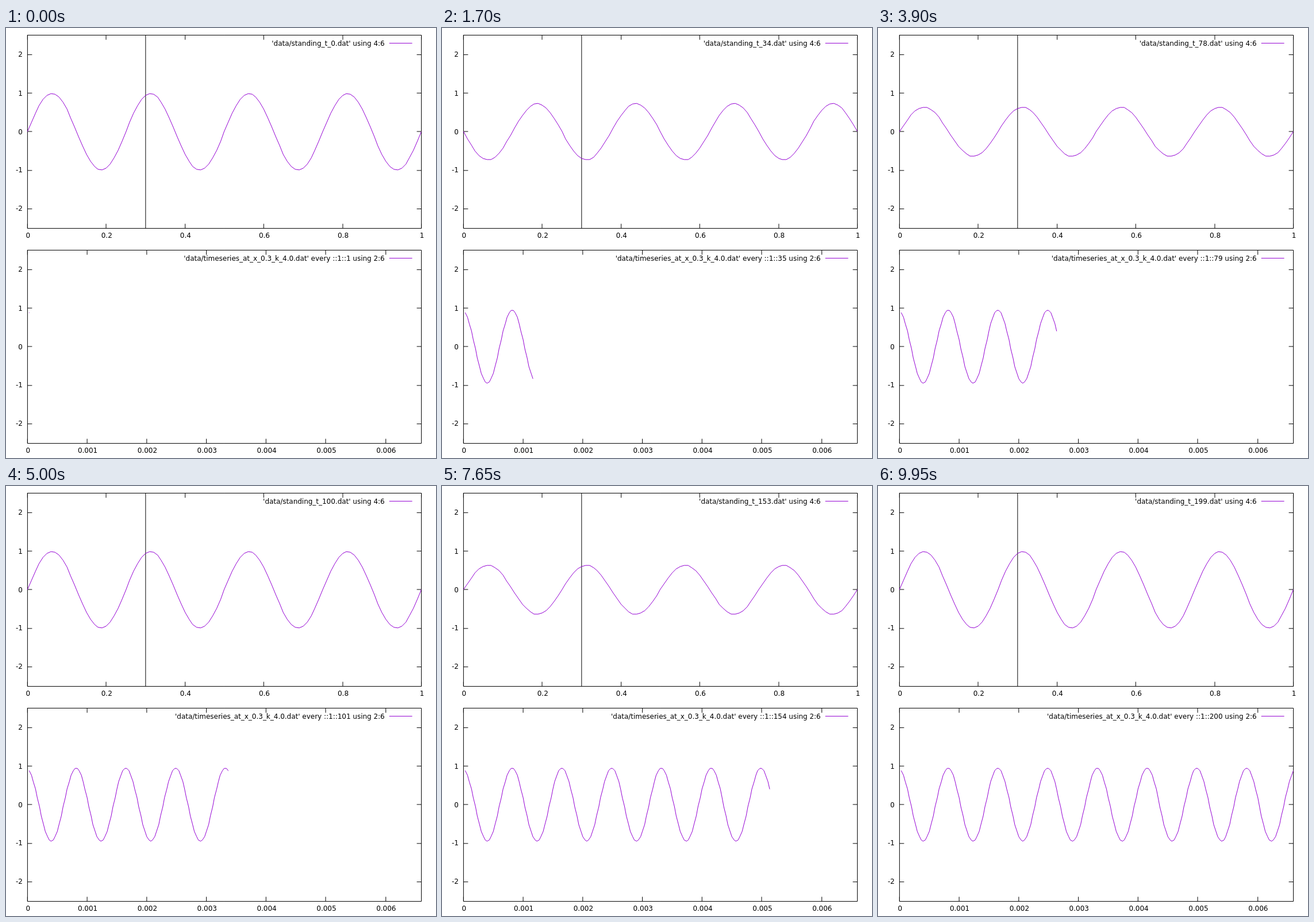
These frames come from a looping animation (748x748 px, 10000 ms). An HTML page with a canvas:

```html
<!DOCTYPE html>
<html>
<head>
<meta charset="utf-8">
<style>
html, body { margin: 0; width: 100%; height: 100%; overflow: hidden; background: #fff; }
canvas { display: block; }
</style>
</head>
<body>
<canvas id="stage" width="748" height="748"></canvas>
<script>
const ctx = document.getElementById('stage').getContext('2d');
const STEP = 50, STEPS = 200, PERIOD = 25;
const PURPLE = '#9400d3';

// The plot is laid out on a 750 unit square and scaled to the stage
const SIZE = 750, SCALE = 748 / SIZE;
const LEFT = 37.3, RIGHT = 724.5, TIC = 8, UNIT = 67.25;
const wave = { mid: 180.9, xMax: 1, xTic: 0.2, digits: 1 };
const series = { mid: 555.9, xMax: 0.0066, xTic: 0.001, digits: 3 };

const snap = v => Math.floor(v) + 0.5;
const mapX = (p, x) => LEFT + x / p.xMax * (RIGHT - LEFT);
const mapY = (p, y) => p.mid - y * UNIT;

const swing = n => Math.cos(2 * Math.PI * (n + 0.5) / PERIOD);
const shape = x => Math.sin(8 * Math.PI * x);

// Vertices sit on unit centres, edges are antialiased
function stroke(points, color = '#000', cap = 'butt') {
  ctx.strokeStyle = color;
  ctx.lineCap = cap;
  ctx.beginPath();
  points.forEach(([x, y], i) => {
    if (!i) ctx.moveTo(snap(x), snap(y));
    ctx.lineTo(snap(x), snap(y));
  });
  ctx.stroke();
}

function text(str, x, y, align) {
  ctx.textAlign = align;
  ctx.fillText(str, x, Math.round(y));
}

function axes(p) {
  const top = mapY(p, 2.5), bottom = mapY(p, -2.5);
  for (let v = -2; v <= 2; v++) {
    const y = mapY(p, v);
    stroke([[LEFT, y], [LEFT + TIC, y]]);
    stroke([[RIGHT - TIC, y], [RIGHT, y]]);
    text(String(v), 29, y + 4, 'right');
  }
  for (let i = 0; i * p.xTic <= p.xMax + 1e-9; i++) {
    const v = i * p.xTic, x = mapX(p, v);
    stroke([[x, top], [x, top + TIC]]);
    stroke([[x, bottom - TIC], [x, bottom]]);
    text(String(+v.toFixed(p.digits)), x + 1, bottom + 17, 'center');
  }
  stroke([[LEFT, top], [RIGHT, top], [RIGHT, bottom], [LEFT, bottom], [LEFT, top]], '#000', 'square');
}

function curve(p, title, points) {
  const top = mapY(p, 2.5), y = top + 14;
  text(title, 660.5, y + 4, 'right');
  stroke([[668, y], [708, y]], PURPLE);
  ctx.save();
  ctx.beginPath();
  ctx.rect(snap(LEFT) - 0.5, top, snap(RIGHT) - snap(LEFT) + 0.5, 5 * UNIT);
  ctx.clip();
  stroke(points.map(([vx, vy]) => [mapX(p, vx), mapY(p, vy)]), PURPLE, 'round');
  ctx.restore();
}

function draw(n) {
  ctx.setTransform(SCALE, 0, 0, SCALE, 0, 0);
  ctx.fillStyle = '#fff';
  ctx.fillRect(0, 0, SIZE, SIZE);
  ctx.fillStyle = '#000';
  ctx.font = '12px "DejaVu Sans", sans-serif';
  ctx.lineWidth = 1;
  ctx.lineJoin = 'round';

  axes(wave);
  const probe = mapX(wave, 0.3);
  stroke([[probe, mapY(wave, 2.5)], [probe, mapY(wave, -2.5)]]);
  curve(wave, `'data/standing_t_${n}.dat' using 4:6`,
    Array.from({ length: 101 }, (_, i) => [i / 100, swing(n) * shape(i / 100)]));

  axes(series);
  curve(series, `'data/timeseries_at_x_0.3_k_4.0.dat' every ::1::${n + 1} using 2:6`,
    Array.from({ length: n + 1 }, (_, i) => [(i + 1) / 30000, swing(i + 1) * shape(0.3)]));
}

let shown = -1;
const start = performance.now();
function tick() {
  const n = Math.floor((performance.now() - start) / STEP) % STEPS;
  if (n !== shown) draw(shown = n);
  requestAnimationFrame(tick);
}
tick();
</script>
</body>
</html>
```
